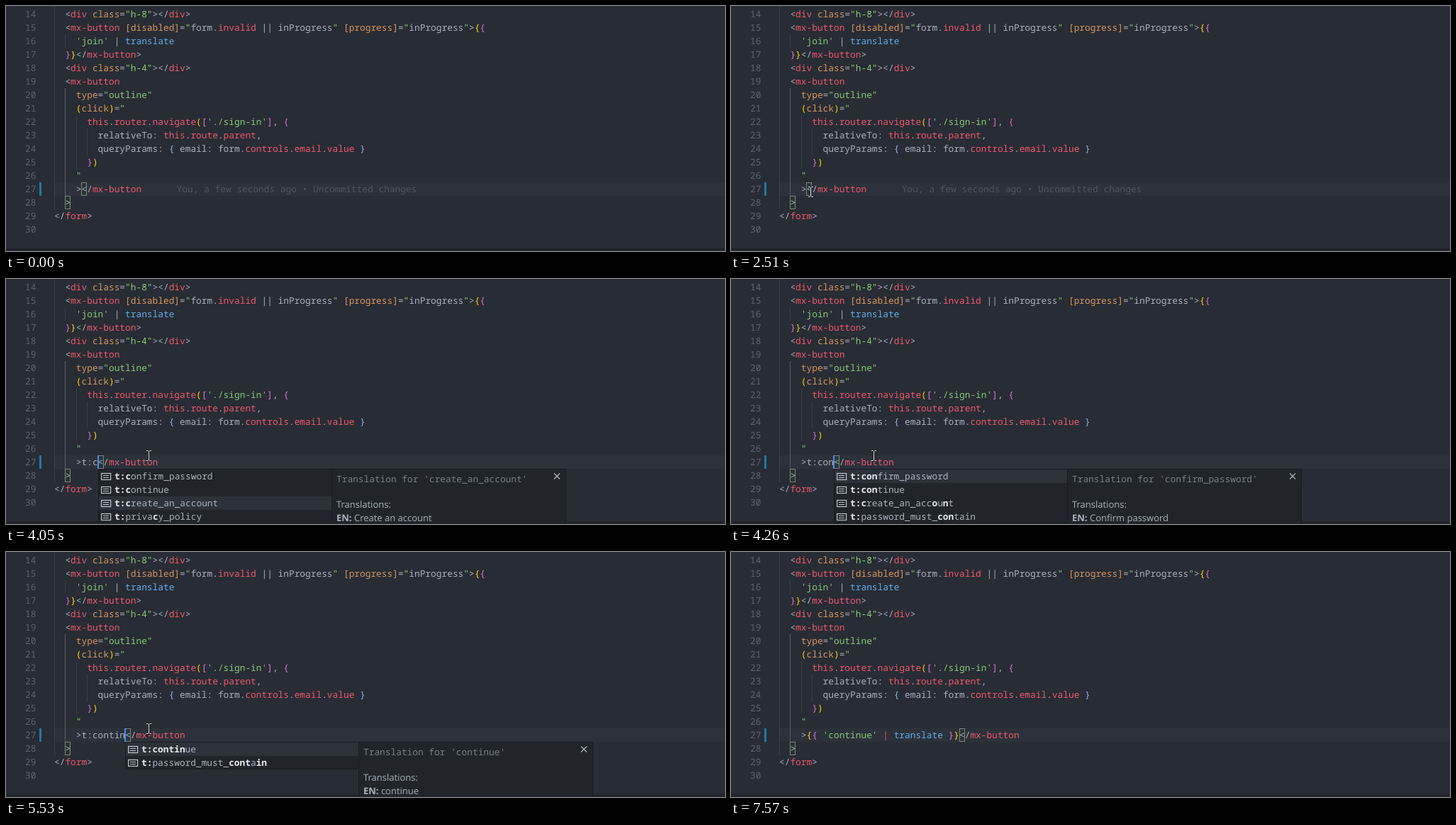
An HTML page with a canvas that plays this animation: 1014x346 px, repeating every 7.98 s.

```html
<!DOCTYPE html>
<html lang="en">
<head>
<meta charset="utf-8">
<title>Editor completion</title>
<style>
html, body { margin: 0; width: 100%; height: 100%; overflow: hidden; background: #282c34; }
canvas { display: block; }
</style>
</head>
<body>
<canvas width="1014" height="346"></canvas>
<script>
const ctx = document.querySelector('canvas').getContext('2d');
const LOOP = 7980, LEFT = 68, CHAR = 7.697, LINE = 19, FIRST = 14;
const MONO = '12.83px "Noto Sans Mono", monospace';
const SANS = '13px "Open Sans", sans-serif';

// "~x" inside a string switches to the colour with key x.
const COLORS = {
  w: '#abb2bf', r: '#ef596f', o: '#d8985f', g: '#89ca78', b: '#61afef',
  y: '#ffd700', p: '#da70d6', s: '#8fb4f5',
  n: '#5c6473', d: '#50555e', h: '#7a808b', B: '#e6e9ee'
};

const CODE = [
  '  ~w<~rdiv ~oclass~w=~g"h-8"~w></~rdiv~w>',
  '  ~w<~rmx-button ~o[disabled]~w=~g"~wform.~rinvalid ~w|| inProgress~g" ~o[progress]~w=~g"~winProgress~g"~w>~y{~p{',
  "    ~g'join' ~w| ~btranslate",
  '  ~p}~y}~w</~rmx-button~w>',
  '  ~w<~rdiv ~oclass~w=~g"h-4"~w></~rdiv~w>',
  '  ~w<~rmx-button',
  '    ~otype~w=~g"outline"',
  '    ~y(~oclick~y)~w=~g"',
  "      ~rthis~w.~rrouter~w.~rnavigate~y(~p[~g'./sign-in'~p]~w, ~p{",
  '        ~wrelativeTo: ~rthis~w.~rroute~w.~rparent~w,',
  '        ~wqueryParams: ~s{ ~wemail: form.~rcontrols~w.~remail~w.~rvalue ~s}',
  '      ~p}~y)',
  '    ~g"',
  '',
  '  ~w>',
  '~w</~rform~w>',
  ''
];

const TRANSLATIONS = {
  sign_in: 'Sign in', confirm_password: 'Confirm password',
  continue: 'continue', create_an_account: 'Create an account'
};
const ITEMS = ['t:sign_in', 't:terms_of_use', 'table', 'tarea', 't:confirm_password', 't:continue',
  't:create_an_account', 't:privacy_policy', 't:password_must_contain'];

const KEYSTROKES = [3160, 3640, 4050, 4160, 4260, 4350, 4450, 4550];
const QUERY = 't:contin';
const POPUP_AT = 3200, ACCEPT_AT = 6030, COLOR_AT = 6100;
const SNIPPET = "{{ 'continue' | translate }}";
const SNIPPET_COLORED = "~y{~p{ ~g'continue' ~r| ~btranslate ~p}~y}";
// Intervals in which the text caret is lit
const CARET_ON = [[2710, 5040], [5530, 6580], [7070, 7570]];

// Pointer waypoints: time, x, y
const POINTER = [
  [1970, 232, 352], [2190, 165, 292], [2360, 92, 240], [2510, 112, 262], [2630, 112, 262],
  [2710, 100, 263], [2810, 100, 263], [3130, 201, 249], [7070, 201, 249], [7390, 739, 340]
];

const lineTop = n => 2 + (n - FIRST) * LINE;
const colX = c => LEFT + c * CHAR;

function rect(x, y, w, h, color) {
  ctx.fillStyle = color;
  ctx.fillRect(x, y, w, h);
}

// Puts monospaced text on the character grid; returns the x after it.
function mono(markup, x, baseline, color = 'w') {
  ctx.textAlign = 'left';
  for (const [i, part] of markup.split('~').entries()) {
    if (i) color = part[0];
    ctx.fillStyle = COLORS[color];
    ctx.font = (color === 'B' ? 'bold ' : '') + MONO;
    for (const ch of i ? part.slice(1) : part) {
      if (ch !== ' ') ctx.fillText(ch, x, baseline);
      x += CHAR;
    }
  }
  return x;
}

function sans(text, x, baseline, weight = '') {
  ctx.font = weight + SANS;
  ctx.fillStyle = COLORS.w;
  ctx.fillText(text, x, baseline);
  return x + ctx.measureText(text).width;
}

function stroke(color, width, ...paths) {
  ctx.strokeStyle = color;
  ctx.lineWidth = width;
  ctx.beginPath();
  for (const path of paths)
    path.forEach(([x, y], i) => i ? ctx.lineTo(x, y) : ctx.moveTo(x, y));
  ctx.stroke();
}

function guide(col, from, to, color = '#3b4048') {
  rect(Math.round(colX(col)), lineTop(from), 1, (to - from + 1) * LINE, color);
}

function bracketBox(col, line) {
  const x = Math.round(colX(col)), y = lineTop(line);
  rect(x, y, 8, LINE, 'rgba(0,100,0,.1)');
  ctx.strokeStyle = '#7f8883';
  ctx.lineWidth = 1;
  ctx.strokeRect(x + .5, y + .5, 7, LINE - 1);
}

// Bold-marks the letters of item matched in order by query; null if it does not match.
function highlight(item, query) {
  let next = 0, out = '';
  for (const ch of item) {
    const hit = ch === query[next];
    if (hit) next++;
    out += (hit ? '~B' : '~w') + ch;
  }
  return next === query.length ? out : null;
}

function rowIcon(isTranslation, x, y) {
  const c = '#c0c5ce';
  if (isTranslation) {
    ctx.strokeStyle = c;
    ctx.lineWidth = 1.2;
    ctx.strokeRect(x + .6, y + 5.5, 13, 9);
    stroke(c, 1, [[x + 3, y + 8.5], [x + 11, y + 8.5]], [[x + 3, y + 11.5], [x + 11, y + 11.5]]);
  } else {
    stroke(c, 1.2, [[x + 9, y + 4], [x + 6, y + 6], [x + 6, y + 9], [x + 1, y + 14], [x + 3, y + 16],
      [x + 8, y + 11], [x + 11, y + 11], [x + 13.5, y + 7], [x + 10.5, y + 8.5], [x + 9, y + 7], [x + 11, y + 4], [x + 9, y + 4]]);
  }
}

function panel(x, y, w, h) {
  rect(x, y, w, h, '#181a1f');
  rect(x + 1, y + 1, w - 2, h - 2, '#21252b');
}

function popup(query, col) {
  const x = Math.round(colX(col)), y = lineTop(28), side = x + 330;
  const rows = ITEMS.filter(item => highlight(item, query)).slice(0, 5);
  const selected = query === 't:c' ? 2 : 0;
  panel(x, y, 330, rows.length * LINE + 1);
  rows.forEach((item, i) => {
    const top = y + 1 + i * LINE;
    if (i === selected) rect(x + 1, top, 328, LINE, '#2c313a');
    rowIcon(item[1] === ':', x + 4, top);
    mono(highlight(item, query), x + 23, top + 14);
  });

  const key = rows[selected].slice(2);
  panel(side - 1, y, 331, 120);
  mono(`Translation for '${key}'`, side + 6, y + 19, 'h');
  sans('Translations:', side + 6, y + 55);
  const after = sans('EN:', side + 6, y + 74, 'bold ');
  sans(' ' + TRANSLATIONS[key], after, y + 74);
  const cx = side + 317, cy = y + 10.5;
  stroke('#b5bac4', 1.1, [[cx - 4, cy - 4], [cx + 4, cy + 4]], [[cx + 4, cy - 4], [cx - 4, cy + 4]]);
}

function pointer(t) {
  const i = POINTER.findIndex(p => p[0] > t);
  if (i < 1) return;
  const [t0, x0, y0] = POINTER[i - 1], [t1, x1, y1] = POINTER[i];
  const k = (t - t0) / (t1 - t0), e = k * k * (3 - 2 * k);
  const x = Math.round(x0 + (x1 - x0) * e) + .5, y = Math.round(y0 + (y1 - y0) * e);
  const shape = [
    [[x - 3.5, y - 6.5], [x - 1, y - 6.5], [x, y - 5.5], [x + 1, y - 6.5], [x + 3.5, y - 6.5]],
    [[x, y - 6], [x, y + 7]],
    [[x - 3.5, y + 7.5], [x - 1, y + 7.5], [x, y + 6.5], [x + 1, y + 7.5], [x + 3.5, y + 7.5]]
  ];
  stroke('#16181c', 2.4, ...shape);
  stroke('#e8e8e8', 1, ...shape);
}

function draw(t) {
  const accepted = t >= ACCEPT_AT;
  const query = QUERY.slice(0, KEYSTROKES.filter(k => t >= k).length);
  const typed = accepted ? SNIPPET : query;
  const caretCol = 5 + typed.length;
  const top = lineTop(27);

  rect(0, 0, 1014, 346, '#282c34');
  rect(LEFT, top, 1014 - LEFT, LINE, '#2c313a');
  rect(47, top, 3, LINE, '#2277a8');
  rect(0, 342, 1014, 4, '#21252b');

  guide(0, 13, 28);
  guide(2, 16, 16);
  guide(2, 20, 27, '#5c6067');
  guide(4, 22, 25);
  guide(6, 23, 24);
  bracketBox(caretCol, 27);
  bracketBox(2, 28);

  CODE.forEach((line, i) => {
    const baseline = lineTop(FIRST + i) + 14;
    mono(String(FIRST + i), 27, baseline, 'n');
    mono(line, LEFT, baseline);
  });
  const inserted = t >= COLOR_AT ? SNIPPET_COLORED : typed;
  const end = mono(`    >${inserted}~w</~rmx-button`, LEFT, top + 14);
  if (t < 3230) mono('You, a few seconds ago • Uncommitted changes', end + 49.5, top + 14, 'd');

  if (CARET_ON.some(([from, to]) => t >= from && t < to))
    rect(Math.round(colX(caretCol)) - 1, top, 2, LINE, '#528bff');
  if (t >= POPUP_AT && !accepted) popup(query, caretCol);
  pointer(t);
}

ctx.textRendering = 'geometricPrecision';
const start = performance.now();
function frame() {
  draw((performance.now() - start) % LOOP);
  requestAnimationFrame(frame);
}
frame();
</script>
</body>
</html>
```
